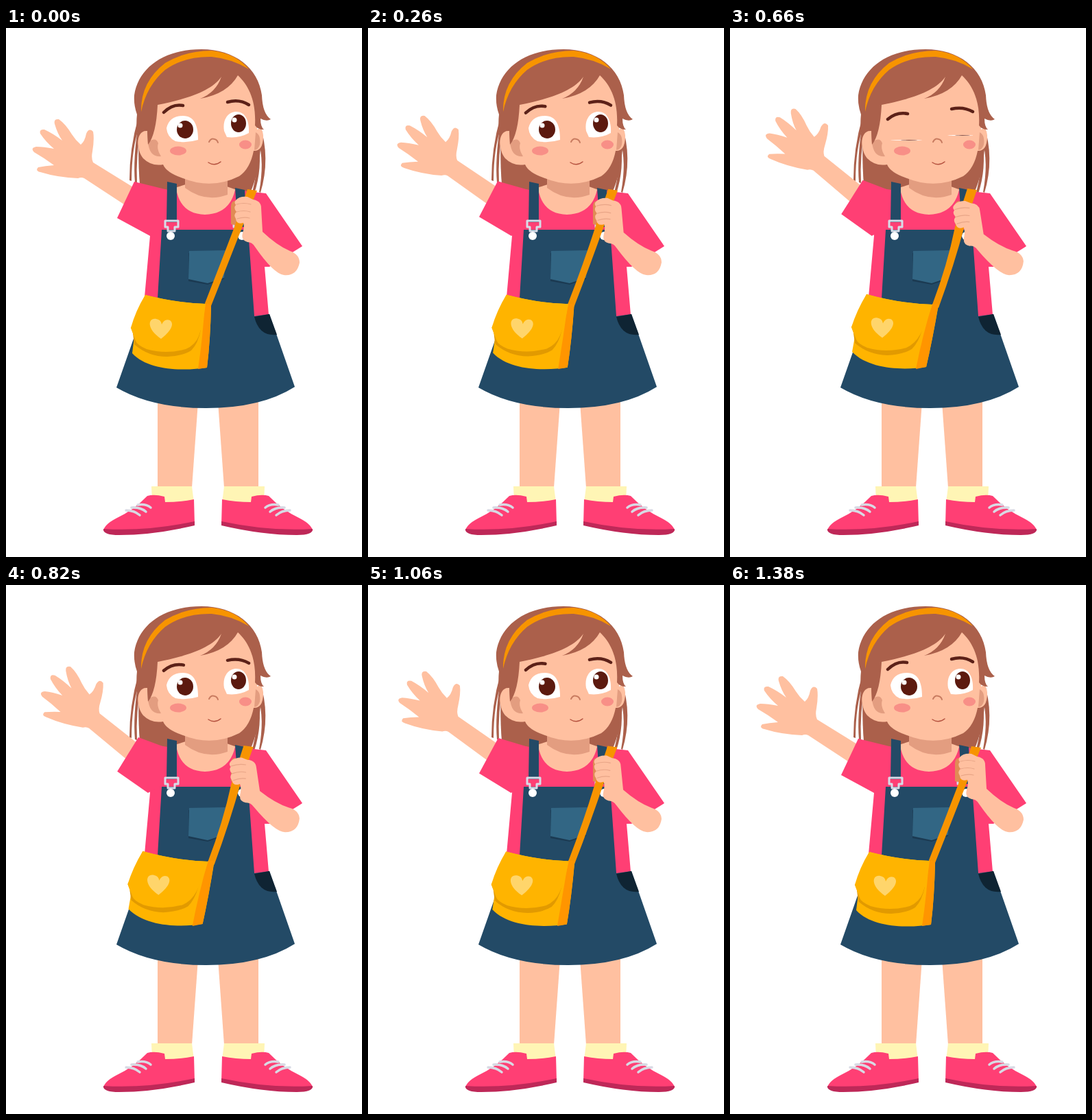
These frames come from a looping animation (519 by 771 pixels, 1.4 s). An HTML page:

```html
<!DOCTYPE html>
<html lang="en">
<head>
<meta charset="utf-8">
<title>Waving girl</title>
<style>
  html, body { margin: 0; width: 100%; height: 100%; overflow: hidden; background: #fff; }
  svg { display: block; width: 100vw; height: 100vh; }
  .skin { fill: #ffc0a0; }
  .hair { fill: #ab604b; }
  .shade { fill: #e39d80; }
  .pink { fill: #ff3f74; }
  .navy { fill: #234a66; }
  .line { fill: none; stroke-linecap: round; stroke-linejoin: round; }
  .iris { fill: #5c1a0f; }
  .white { fill: #fff; }
</style>
</head>
<body>
<svg viewBox="0 0 519 771">
  <!-- back hair and neck -->
  <g class="hair">
    <path d="M193 130Q180 175 180 222L183 223Q183 175 195 142Z"/>
    <path d="M193 140Q185 190 188 225L191 226Q189 185 197 145Z"/>
    <path d="M194 140Q192 190 195 228L235 240L270 240V190L220 150Z"/>
    <path d="M320 200V236L356 240Q369 212 372 165L360 150Z"/>
    <path d="M370 140Q386 190 371 240L369 239Q377 195 368 165Z"/>
    <path d="M368 165Q374 205 362 241L359 240Q368 205 366 170Z"/>
  </g>
  <path class="skin" d="M262 210V228L246 233Q254 272 290 274Q328 272 336 236L322 231V210Z"/>
  <path class="shade" d="M261 218V233Q290 255 323 243V218Z"/>

  <!-- legs and shoes -->
  <g id="leg">
    <path class="skin" d="M221 540V670H271L280 545Z"/>
    <path fill="#fff5b5" d="M212 668H271L274 692H213Z"/>
    <path class="pink" d="M206 682Q216 679 231 683L232 691Q254 691 274 687L275 724Q200 741 142 733Q143 724 160 715Q186 703 206 682Z"/>
    <path fill="#be2858" d="M142 730Q205 734 275 719V725Q215 739 165 739Q141 739 142 730Z"/>
    <path class="line" stroke="#d8dae4" stroke-width="3.5" d="M175 703Q187 703 195 710M183 699Q196 698 204 705M192 695Q204 693 211 699"/>
  </g>
  <use href="#leg" transform="translate(589) scale(-1 1)"/>

  <!-- clothes -->
  <path class="pink" d="M200 231L236 236L248 234Q254 271 290 272Q326 271 334 236L379 241L432 318L384 348H377L383 418L300 430L202 392L210 303Z"/>
  <g id="wave">
    <path class="skin" d="M195 238L127 196Q124 190 126 180Q129 162 127 151Q121 145 117 154Q115 165 109 170Q101 163 96 155Q87 140 77 133Q69 132 71 140Q75 154 82 164Q69 154 56 148Q48 147 50 154Q58 166 70 176Q55 173 44 173Q35 175 41 181Q55 189 70 200Q57 201 47 203Q42 208 50 210Q76 218 105 219Q110 217 114 219L172 257Z"/>
    <path class="pink" d="M187 224L162 277L210 303L236 285V236Z"/>
  </g>
  <path class="navy" d="M235 224L249 227V283H234ZM334 233L348 236L351 290H338ZM227 294H353L362 420L384 417L421 523Q372 554 292 554Q212 554 161 524L187 450L202 400L221 394Z"/>
  <path fill="#0f2433" d="M362 421L384 417L395 447Q369 450 362 421Z"/>
  <path fill="#1b3a52" d="M266 328V369L294 374L318 366V340Z"/>
  <path fill="#326684" d="M267 325L320 324L318 364L294 372L266 366Z"/>
  <path class="line" stroke="#d7dce8" stroke-width="3" d="M232 290V281H251V290H246V296H236V290ZM332 290V282"/>
  <circle class="white" cx="240" cy="303" r="6"/>
  <circle class="white" cx="344" cy="303" r="6"/>

  <!-- head -->
  <path class="skin" d="M206 150C190 148 188 175 200 190Q212 202 229 199Q234 211 258 219Q300 236 340 216Q356 205 361 179Q374 180 375 160Q375 143 366 148Q372 100 345 60L240 80L215 120Z"/>
  <path class="shade" d="M207 166Q219 158 222 168Q219 176 226 187Q209 189 207 166ZM364 152Q372 156 370 170Q368 177 362 178Z"/>
  <path class="hair" d="M193 155Q189 145 191 126Q186 112 187 98C193 58 230 31 285 31C333 31 368 58 373 98Q374 125 386 133Q380 137 371 132Q371 144 376 148Q367 148 363 142C365 105 353 83 338 69Q323 96 283 103Q306 94 314 71C300 92 262 104 221 112Q219 155 207 170Q206 158 206 150Q197 149 193 155Z"/>
  <path fill="#f79400" d="M197 122Q196 79 232 51Q262 33 300 33Q335 37 354 60Q330 45 300 42Q260 41 232 61Q205 84 197 122Z"/>
  <g id="leftEye">
    <path class="white" d="M234 146Q238 128 258 128C275 128 280 143 280 163Q264 168 247 165Q235 159 234 146Z"/>
    <ellipse class="iris" cx="261" cy="148" rx="12" ry="13"/>
    <circle class="white" cx="254" cy="142" r="3.5"/>
  </g>
  <g id="rightEye">
    <path class="white" d="M318 150C315 132 325 122 336 122C348 122 355 134 354 153Q340 161 322 159Z"/>
    <ellipse class="iris" cx="339" cy="139" rx="11" ry="13"/>
    <circle class="white" cx="333" cy="134" r="3.5"/>
  </g>
  <g class="line" stroke="#5c2118" stroke-width="4.5">
    <path data-drop d="M230 123Q243 110 258 113" data-to="M230 125Q243 114 259 117"/>
    <path data-drop d="M323 108Q340 103 354 112" data-to="M323 110Q340 106 354 114"/>
  </g>
  <path class="line" stroke="#c87b60" stroke-width="2" d="M296 166Q299 160 304 162Q308 163 309 167"/>
  <path class="line" stroke="#b5523f" stroke-width="1.5" d="M295 196Q304 202 313 195"/>
  <g fill="#f88f87">
    <ellipse cx="251" cy="179" rx="12" ry="6.5"/>
    <ellipse cx="349" cy="170" rx="9" ry="6.5"/>
  </g>

  <!-- bag -->
  <path fill="#e08b55" d="M334 252Q327 253 328 262V286L338 288Z"/>
  <path fill="#f79400" d="M352 235L366 237L346 286Q323 345 299 405L290 401Q312 345 333 290Z"
    data-to="M346 234L360 236L342 288Q327 345 304 408L295 403Q317 345 328 290Z"/>
  <path fill="#ffb400" d="M203 389Q250 401 291 402L299 404Q298 455 293 495C260 500 208 500 184 474L187 450L182 437Z"
    data-to="M199 388Q250 402 295 403L304 404Q295 455 286 494C254 499 203 498 178 472L182 450L177 436Z"/>
  <path fill="#ff9500" d="M290 401L299 403Q298 455 293 495L280 497Q287 450 290 401Z"
    data-to="M295 402L304 402Q295 455 286 494L271 497Q280 450 295 402Z"/>
  <path fill="#e29a00" d="M185 445L187 461Q207 479 235 479Q258 478 270 470Q280 460 284 440Z"
    data-to="M180 445L182 459Q201 476 229 477Q252 476 265 468Q275 458 280 440Z"/>
  <path fill="#ffb400" d="M203 389Q250 401 291 402Q288 430 281 449Q276 462 262 468Q233 476 205 468Q191 462 189 456L182 437Q189 412 203 389Z"
    data-to="M199 388Q250 402 295 403Q286 430 277 447Q270 460 257 466Q228 474 200 466Q186 460 184 454L177 436Q185 411 199 388Z"/>
  <path id="heart" fill="#ffd56b" d="M226 453C204 438 207 422 219 424Q226 425 227 432Q231 423 239 426C247 432 238 444 226 453Z"/>

  <!-- arm holding the strap -->
  <g id="hold">
    <path class="skin" d="M335 251Q340 245 352 246L360 250Q372 252 372 262L374 297Q395 317 414 325Q428 330 428 342Q424 362 405 360Q390 358 363 319Q359 312 352 312Q342 309 345 299Q348 290 346 284Q336 287 335 278Q331 272 336 268Q331 262 335 258Q332 254 335 251Z"/>
    <path class="line" stroke="#e8a587" stroke-width="1.2" d="M336 257Q347 254 357 257M336 268Q347 265 356 268M337 278Q347 275 355 277"/>
  </g>
</svg>
<script>
const loop = 1400, swing = 1380, step = 20;
const $ = id => document.getElementById(id);
const numbers = d => d.match(/[\d.]+/g).map(Number);

const morphs = [...document.querySelectorAll('[data-to]')].map(el => {
  const shape = el.getAttribute('d');
  return { el, shape, from: numbers(shape), to: numbers(el.dataset.to) };
});

function squash(id, base, amount) {
  $(id).setAttribute('transform', `translate(0 ${base}) scale(1 ${amount}) translate(0 ${-base})`);
}

function draw(now) {
  const t = Math.floor(now % loop / step) * step;
  const p = (1 - Math.cos(2 * Math.PI * t / swing)) / 2;
  const near = Math.max(0, 1 - Math.abs(t - 660) / 140);
  const blink = near * near * (3 - 2 * near);

  $('wave').setAttribute('transform', `rotate(${7.1 * p} 208 276)`);
  $('hold').setAttribute('transform', `rotate(${-5.7 * p} 408 342)`);
  $('heart').setAttribute('transform', `translate(${-4 * p} ${-1.5 * p})`);
  squash('leftEye', 164, 1 - 0.97 * blink);
  squash('rightEye', 157, 1 - 0.97 * blink);

  for (const { el, shape, from, to } of morphs) {
    let i = 0;
    el.setAttribute('d', shape.replace(/[\d.]+/g, () => {
      const value = from[i] + (to[i] - from[i]) * p;
      i++;
      return value.toFixed(2);
    }));
    if ('drop' in el.dataset) el.setAttribute('transform', `translate(0 ${8 * blink})`);
  }
  requestAnimationFrame(draw);
}
requestAnimationFrame(draw);
</script>
</body>
</html>
```
